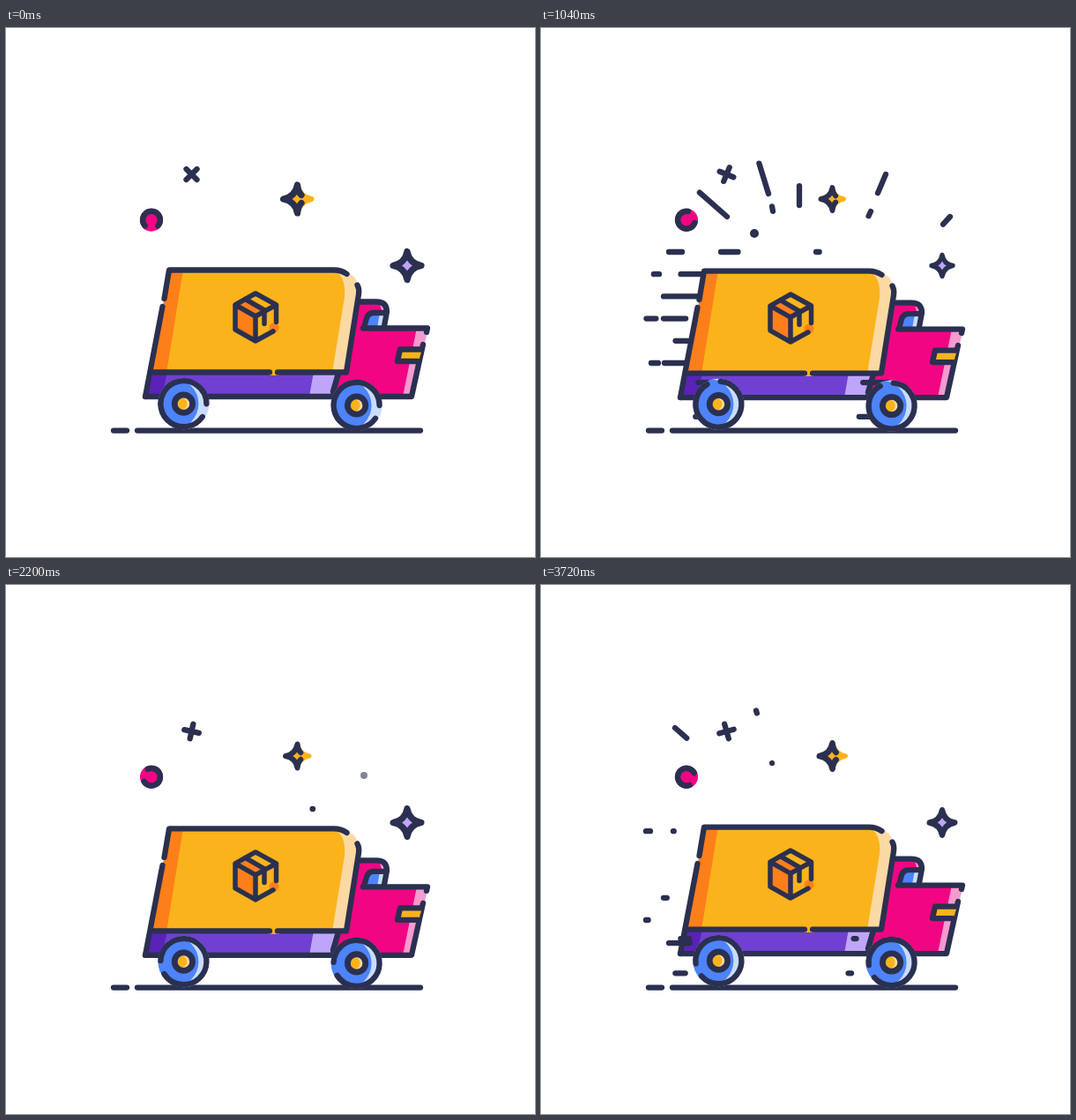
An HTML page with a canvas for the animation above (3.76 s loop, 600 px wide and 600 px high).

```html
<!DOCTYPE html>
<html lang="en">
<head>
<meta charset="utf-8">
<title>Delivery truck</title>
<style>
html, body { margin: 0; width: 100%; height: 100%; overflow: hidden; background: #fff; }
canvas { display: block; }
</style>
</head>
<body>
<canvas id="stage" width="600" height="600"></canvas>
<script>
const ctx = document.getElementById('stage').getContext('2d');
const LOOP = 3760, SPIN = 3120, STREAK = 2100, TAU = Math.PI * 2;
const DARK = '#2b3050', YELLOW = '#fbb31b', ORANGE = '#fd7f1a', CREAM = '#fbd9a2',
      PINK = '#f10583', ROSE = '#f49bd0', BLUE = '#4d83fb', NAVY = '#4470e4',
      ICE = '#c9dcfb', LILAC = '#bfa5f8';
const WHEELS = [397.6, 201.4];

const ease = u => (1 - Math.cos(Math.PI * Math.min(1, Math.max(0, u)))) / 2;
const wave = (t, period) => ease(2 * t / period % 2 < 1 ? 2 * t / period % 2 : 2 - 2 * t / period % 2);

function fill(color, d) {
  ctx.fillStyle = color;
  ctx.fill(new Path2D(d));
}
function stroke(d, width = 6.3, color = DARK) {
  ctx.lineWidth = width;
  ctx.strokeStyle = color;
  ctx.stroke(new Path2D(d));
}
function disc(x, y, r, color) {
  ctx.fillStyle = color;
  ctx.beginPath();
  ctx.arc(x, y, r, 0, TAU);
  ctx.fill();
}
function ring(r, width, from = 0, to = TAU) {
  ctx.lineWidth = width;
  ctx.strokeStyle = DARK;
  ctx.beginPath();
  ctx.arc(0, 0, r, from, to);
  ctx.stroke();
}
function at(x, y, draw) {
  ctx.save();
  ctx.translate(x, y);
  draw();
  ctx.restore();
}

// A line that grows from its first point and is then eaten up from there; age in ms.
function streak(x0, y0, x1, y1, age) {
  const head = ease(age / 650), tail = ease((age - 470) / 650);
  if (head <= 0 || tail >= 1) return;
  const point = k => `${x0 + (x1 - x0) * k} ${y0 + (y1 - y0) * k}`;
  stroke(`M${point(tail)}L${point(Math.max(head, tail + 0.001))}`);
}

// Wind behind the truck: evenly spaced rows, one dash starting every 70 ms.
function wind(phase) {
  const dashes = [
    [348, 0, 312], [291, 0, 204], [185, 0, 145], [185, 3, 139], [185, 5, 140], [195, 2, 139],
    [131, 3, 119], [215, 1, 150], [190, 4, 139], [133, 5, 119], [134, 1, 119]
  ];
  dashes.forEach(([from, row, to], i) => {
    const y = 254 + 25.2 * row;
    streak(from, y, to, y, phase - 55 - 70 * i);
  });
}

// Rays above the truck fire one by one from right to left.
function rays(phase) {
  const lines = [
    [421, 260.5, 464, 214], [368, 221, 374, 208], [377, 199, 391, 166], [293, 205, 293, 179],
    [263, 208, 262, 202], [258, 188, 244, 142.5], [211, 214, 152, 162]
  ];
  lines.forEach((line, i) => streak(...line, phase - 105 - 100 * i));
}

// The same dash trails behind both wheels, the rear one a little later.
function wheelTrails(y, length, phase) {
  WHEELS.forEach((x, i) => streak(x - 3, y, x - length, y, phase - 615 - 100 * i));
}

function popDot(x, y, r, age) {
  if (age < 0 || age > 1160) return;
  ctx.globalAlpha = Math.min(1, (1160 - age) / 270);
  disc(x, y, r * ease(age / 300), DARK);
  ctx.globalAlpha = 1;
}

function star(x, y, scale, color, openRight) {
  const shape = 'M0-16Q2.5-2.5 16 0Q2.5 2.5 0 16Q-2.5 2.5-16 0Q-2.5-2.5 0-16Z';
  at(x, y, () => {
    ctx.scale(scale, scale);
    fill(color, shape);
    if (openRight) {
      stroke(shape, 6, color);
      stroke('M4.5 4.5Q1 8 0 16Q-2.5 2.5-16 0Q-2.5-2.5 0-16Q1-8 4.5-4.5', 7.2);
    } else stroke(shape, 7.2);
  });
}

function wheel(x, y, turn) {
  at(x, y, () => {
    ctx.save();
    ctx.beginPath();
    ctx.arc(0, 0, 29, 0, TAU);
    ctx.clip();
    disc(0, 0, 30, ICE);
    disc(-12, 0, 29, BLUE);
    ctx.restore();
    ring(26, 6.3, turn + 0.6, turn + TAU);
    disc(0, 0, 9, CREAM);
    disc(-3, 0, 7, YELLOW);
    ring(10.2, 6.8);
  });
}

function parcel() {
  fill(YELLOW, 'M283 301L307 314V342L283 355L260 342V314Z');
  fill(ORANGE, 'M260 314L271.5 307.5L294 320L283 327V355L260 342Z');
  disc(304, 340, 5.5, ORANGE);
  stroke('M306.5 333.5V314L283 301L260 314V342L283 355L303 344M260 314L283 327L306.5 314M283 327V355', 5.5);
  stroke('M271.5 307.5L293 320V335.5', 5.5);
}

function truckBody() {
  // chassis
  fill('#7040d2', 'M164 390H384L372 418H158Z');
  fill('#5a22b8', 'M164 390H183L177 418H158Z');
  fill(LILAC, 'M349 390H374L367 418H344Z');

  // cab
  fill(PINK, 'M400 310H420Q432 310 432 322L429 340H478L460 418H370L377 390H386Z');
  fill(ROSE, 'M466 340H479L461 418H450ZM420 310Q432 310 432 322H426Q426 314 420 310Z');
  fill(BLUE, 'M406 340L409 329Q411 323 417 323H427L424 340Z');
  fill(ICE, 'M424 323H432L429 340H421Z');
  stroke('M401 310.5H420Q432 310.5 432 322L429 338M406 340L409 329Q411 323 417 323H431');
  stroke('M405 340.5H478L477 345M473 359L460 418H158M377 392L371 412');
  fill(YELLOW, 'M447 364H472L468 378H444Z');
  stroke('M471 364.5H447L444 378H467');

  // cargo box
  fill(CREAM, 'M185 274H372Q402 275 400 302L386 391H168Z');
  fill(YELLOW, 'M185 274H370Q386 280 384 305L370 391H166Z');
  fill(ORANGE, 'M185 274H201L182 391H165Z');
  fill(YELLOW, 'M298 389H310V394H298Z');
  stroke('M179.5 307L185 274.5H372Q380 274.5 386.5 279M398.5 291.5Q401 296 400 302L386 390.5H308M299 390.5H168M177.5 316L158 418');
  parcel();
}

function draw(time) {
  const spin = time % SPIN, phase = time % STREAK;
  const bounce = wave(time, LOOP / 3);
  const turn = TAU * spin / SPIN;

  ctx.fillStyle = '#fff';
  ctx.fillRect(0, 0, 600, 600);
  ctx.lineCap = ctx.lineJoin = 'round';

  wind(phase);
  rays(phase);
  popDot(242, 233, 5, spin - 570);
  popDot(406, 216, 4, spin - 1200);

  at(210.5, 166, () => {
    ctx.rotate(Math.PI / 2 * wave(spin, SPIN));
    stroke('M-6-6L6 6M6-6L-6 6');
  });
  at(165, 217.7, () => {
    ctx.rotate(Math.PI / 2 - turn);
    disc(0, 0, 13, PINK);
    ring(9.9, 6.5, 0.85, TAU - 0.85);
  });

  star(330.5, 194, 1 - 0.25 * wave(spin, SPIN), YELLOW, true);
  star(455, 269.5, 1 - 0.25 * wave(phase, STREAK), LILAC, false);

  stroke('M122 456.6H137M149 456.6H470');
  at(0, 4 * bounce, () => {
    truckBody();
    wheelTrails(401, 43, phase);
    streak(200, 406, 145, 406, phase - 800);
  });
  at(0, 2 * bounce, () => {
    wheelTrails(440.3, 49, phase);
    WHEELS.forEach((x, i) => wheel(x, 428 - 1.8 * i, turn * 2));
  });
}

function tick() {
  draw(performance.now() % LOOP);
  requestAnimationFrame(tick);
}
tick();
</script>
</body>
</html>
```
